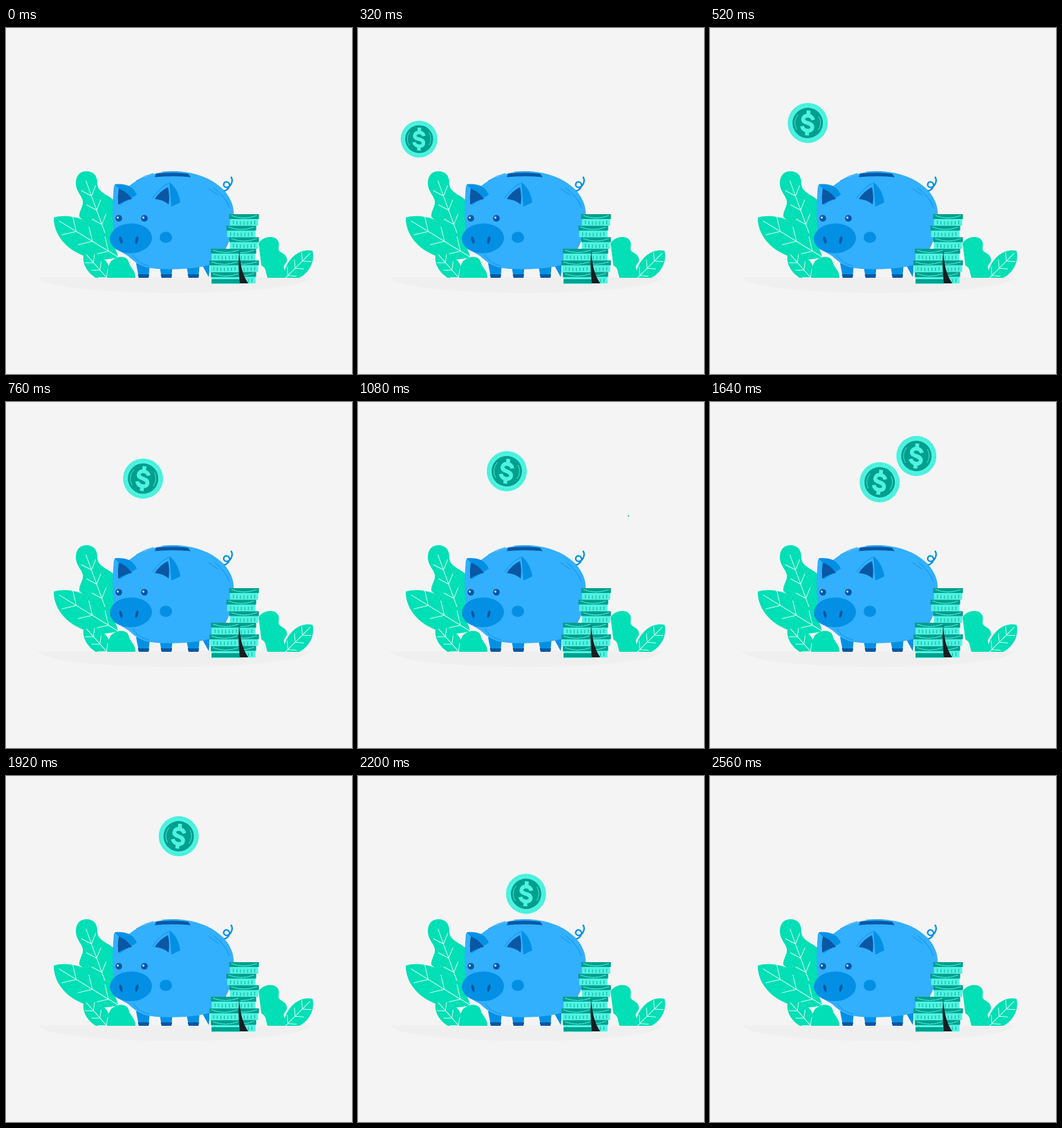
Recreate the animation shown at these times as an HTML page with a canvas. Size 500x500 px, loop 2680 ms.

```html
<!DOCTYPE html>
<html lang="en">
<head>
<meta charset="utf-8">
<title>Piggy bank</title>
<style>
html, body { margin: 0; width: 100%; height: 100%; overflow: hidden; background: #f4f4f4; }
canvas { display: block; width: 500px; height: 500px; }
</style>
</head>
<body>
<canvas id="stage" width="500" height="500"></canvas>
<script>
const LOOP = 2680, STEP = 40, RADIUS = 29;
const GROUND_Y = 361;
const SLOT = { x: 241, y: 216, depth: 250 };
const C = {
  bg: '#f4f4f4', ground: '#efefef', leaf: '#00dfb5', vein: '#d2fbf1',
  body: '#32affd', mid: '#0390e4', dark: '#0a57a3',
  light: '#4ff3e2', teal: '#009f8d'
};
const ctx = document.getElementById('stage').getContext('2d');

const clamp = u => Math.min(1, Math.max(0, u));
const mix = (a, b, u) => a + (b - a) * u;
const smooth = u => u * u * (3 - 2 * u);
const easeInOut = u => u < .5 ? 2 * u * u : 1 - 2 * (1 - u) ** 2;

function fill(d, color) {
  ctx.fillStyle = color;
  ctx.fill(new Path2D(d));
}
function line(d, color, width = 1) {
  ctx.strokeStyle = color;
  ctx.lineWidth = width;
  ctx.stroke(new Path2D(d));
}
function oval(x, y, rx, ry, color, angle = 0, end = 7) {
  ctx.fillStyle = color;
  ctx.beginPath();
  ctx.ellipse(x, y, rx, ry, angle, 0, end);
  ctx.fill();
}
function clipAbove(y, draw) {
  ctx.save();
  ctx.beginPath();
  ctx.rect(0, 0, 500, y);
  ctx.clip();
  draw();
  ctx.restore();
}

// Runs draw with the x axis leading from the tip to the base
function alongAxis([tx, ty], [bx, by], draw) {
  ctx.save();
  ctx.translate(tx, ty);
  ctx.rotate(Math.atan2(by - ty, bx - tx));
  draw(Math.hypot(bx - tx, by - ty));
  ctx.restore();
}
function veins(tip, base, width, pairs) {
  alongAxis(tip, base, len => {
    let d = `M${len * .08} 0H${len}`;
    for (let i = 0; i < pairs; i++) {
      const u = mix(.35, .85, i / (pairs - 1));
      for (const side of [-1, 1]) d += `M${len * u} 0L${len * (u - .14)} ${side * width * .65}`;
    }
    line(d, C.vein);
  });
}
function leaf(tip, base, left, right, pairs) {
  alongAxis(tip, base, len => {
    const edge = (a, b, w) => `${len * a} ${w * 1.25} ${len * b} ${w * 1.4}`;
    fill(`M0 0C${edge(.2, .75, -left)} ${len} 0C${edge(.75, .2, right)} 0 0`, C.leaf);
  });
  veins(tip, base, (left + right) / 2, pairs);
}

function drawPlants() {
  fill('M116 207C128 207 132 215 132 225C133 239 148 240 158 251V320L106 273C105 264 112 259 111 250C110 242 100 236 101 222C102 212 108 207 116 207Z', C.leaf);
  veins([113, 214], [143, 296], 17, 3);
  leaf([69, 274], [162, 331], 21, 26, 3);
  fill('M140 361L151 338C158 329 174 328 177 337C179 347 187 349 187 361Z', C.leaf);
  leaf([113, 324], [151, 367], 15, 14, 3);
  fill('M378 361C375 354 377 347 369 343L365 311C370 304 376 302 382 302C391 302 396 308 394 317C392 326 406 324 406 335C406 341 400 341 402 348L405 361Z', C.leaf);
  leaf([443, 322], [401, 364], 16, 14, 3);
}

function drawPig() {
  for (const x of [188, 221, 260]) {
    fill(`M${x} 340h20l-2 21h-14z`, C.mid);
    fill(`M${x + 2.5} 356h16.5l-1 5h-14z`, C.dark);
  }
  fill('M282 340H294V352L293 360Z', C.mid);
  line('M309 234C318 239 326 229 322 224C317 219 311 227 317 230C323 232 330 222 325 215', C.mid, 2.2);
  // body, then head
  fill('M157 268A86 61 0 0 1 329 268C329 300 318 330 295 342C270 350 222 350 203 346C182 340 168 322 157 300Z', C.body);
  fill('M156 228L186 228V335L160 320C153 290 153 260 156 228Z', C.body);
  line('M300 231Q317 243 323 260M293 232L307 242M188 221Q200 213 213 210M183 328Q192 341 207 344M226 208H249', C.mid, .8);
  fill('M217 210.5Q241 208 263 210.5L267 215.5Q241 213 215 215.5Z', C.dark);

  fill('M157 226C173 224 185 230 189 241L164 256L156 243Z', C.mid);
  fill('M157 226L163 232L162 256L155 256Z', C.body);
  fill('M163 232C171 235 177 240 182 247Q171 249 162 255Q161 243 163 232Z', C.dark);
  fill('M236 223C246 230 250 241 252 252L239 258Z', C.mid);
  line('M236 224Q222 230 212 246', C.mid, .8);
  fill('M234 230Q222 236 215 247Q227 248 235 255Q237 242 234 230Z', C.dark);

  for (const x of [163, 200]) {
    oval(x, 275, 4.8, 4.8, C.dark);
    oval(x - 1.5, 274, 1.4, 1.4, '#eefaff');
  }
  oval(180.5, 304, 30.5, 21.5, C.mid, -.04);
  for (const side of [-1, 1]) oval(177.5 + side * 11.5, 306.5, 2.1, 5.5, C.dark, side * .25);
  oval(231, 302.5, 9, 8, C.mid);
}

function drawStack(x, top, count, pitch, sway) {
  const w = 41;
  for (let i = 0; i < count; i++) {
    const left = x + (i % 2 ? -sway : sway), y = top + i * pitch;
    ctx.fillStyle = C.light;
    ctx.fillRect(left, y, w, pitch);
    ctx.fillStyle = C.teal;
    ctx.fillRect(left - 1, y, w + 2, 7);
    line(`M${left + 2} ${y + 2}q${w / 2 - 2} 7 ${w - 4} 0`, C.light);
    let ticks = '';
    for (let k = 1; k < 8; k++) ticks += `M${left + w * k / 8} ${y + 9 + 1.5 * Math.sin(k * Math.PI / 8)}v5`;
    line(ticks, C.teal, .8);
  }
}
function drawStacks() {
  drawStack(321.5, 269, 6, 16.7, 2);
  drawStack(296, 319, 3, 17, 1);
  fill('M297 363H338V369H297Z', C.teal);
  fill('M337 321C338 342 342 357 350 369H338Q335 346 337 321Z', '#191d20');
}

// Each coin glides sideways, lifts to its top, then drops into the slot
const coins = [
  { start: 40, from: [61, 177], over: [215, 100], glide: 940, lift: 940, dropAt: 1080, drop: 338 },
  { start: 1040, from: [392, 165], over: [241, 114], glide: 680, lift: 680, dropAt: 1660, drop: 240 },
  { start: 1100, from: [392, 130], over: [245, 78], glide: 940, lift: 500, dropAt: 1680, drop: 640 }
];
function drawCoin(coin, t) {
  const age = t - coin.start;
  const fall = clamp((t - coin.dropAt) / coin.drop) ** 3;
  if (age <= 0 || fall >= 1) return;
  const glide = easeInOut(clamp(age / coin.glide));
  const lift = smooth(clamp(age / coin.lift));
  const size = smooth(clamp(age / 340));
  const x = mix(coin.from[0], coin.over[0], glide) + (SLOT.x - coin.over[0]) * fall;
  const y = mix(coin.from[1], coin.over[1], lift) + (SLOT.depth - coin.over[1]) * fall;

  ctx.save();
  ctx.translate(x, y);
  ctx.rotate(.13 * glide * (1 - fall));
  ctx.scale(size, size);
  oval(0, 0, RADIUS, RADIUS, C.light);
  ctx.setLineDash([.6, 2.9]);
  line('M26.5 0A26.5 26.5 0 1 1 26.5 -.1', '#32dfce', 3);
  ctx.setLineDash([]);
  oval(0, 0, 22, 22, C.teal);
  line('M-15 11A18.5 18.5 0 0 1 -15 -11M15 -11A18.5 18.5 0 0 1 16 9', C.light, .8);
  line('M7.5 -5C5 -13 -7 -12 -7 -5C-7 2 7 -2 7 6C7 13 -6 13 -8 5M0 -18V-10M0 10V18', C.light, 5.6);
  ctx.restore();
}

function render() {
  const t = Math.floor(performance.now() % LOOP / STEP) * STEP;
  ctx.fillStyle = C.bg;
  ctx.fillRect(0, 0, 500, 500);
  oval(243, 360, 196, 23, C.ground, 0, Math.PI);
  clipAbove(GROUND_Y, drawPlants);
  drawPig();
  drawStacks();
  clipAbove(SLOT.y, () => coins.forEach(coin => drawCoin(coin, t)));
  requestAnimationFrame(render);
}
render();
</script>
</body>
</html>
```
